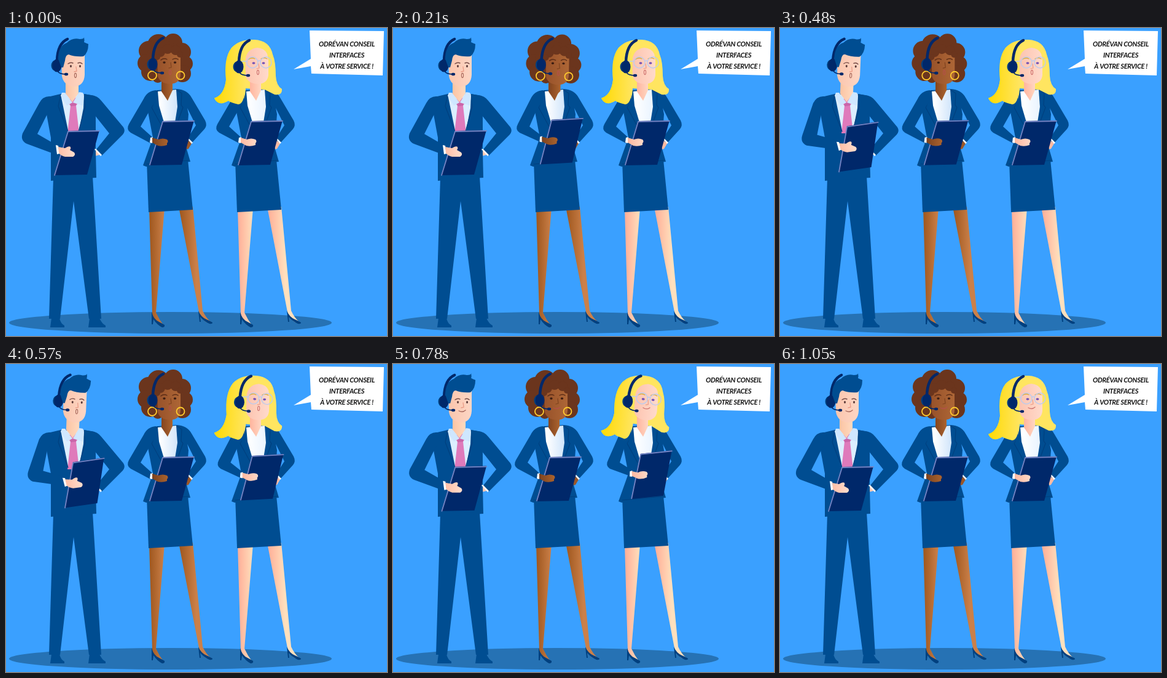
An HTML page with a canvas for the animation above (1.08 s loop, 620 by 500 pixels).

```html
<!DOCTYPE html>
<html lang="fr">
<head>
<meta charset="utf-8">
<style>
html, body { margin: 0; width: 100%; height: 100%; overflow: hidden; background: #3aa0ff; }
canvas { display: block; }
</style>
</head>
<body>
<canvas id="stage" width="620" height="500"></canvas>
<script>
const ctx = document.getElementById('stage').getContext('2d');
const LOOP = 1080, STEP = 30;
const SUIT = '#004d91', SEAM = '#00407f', NAVY = '#00286a', EDGE = '#7584c4';

const fill = (color, d) => { ctx.fillStyle = color; ctx.fill(new Path2D(d)); };
const line = (color, width, d) => {
  ctx.strokeStyle = color;
  ctx.lineWidth = width;
  ctx.stroke(new Path2D(d));
};
const oval = (color, x, y, rx, ry = rx) => {
  ctx.fillStyle = color;
  ctx.beginPath();
  ctx.ellipse(x, y, rx, ry, 0, 0, Math.PI * 2);
  ctx.fill();
};
const ring = (color, width, x, y, rx, ry = rx) => {
  ctx.strokeStyle = color;
  ctx.lineWidth = width;
  ctx.beginPath();
  ctx.ellipse(x, y, rx, ry, 0, 0, Math.PI * 2);
  ctx.stroke();
};
const fade = (x0, x1, a, b) => {
  const g = ctx.createLinearGradient(x0, 0, x1, 0);
  g.addColorStop(0, a);
  g.addColorStop(1, b);
  return g;
};
const group = (dx, dy, deg, px, py, draw) => {
  ctx.save();
  ctx.translate(px + dx, py + dy);
  ctx.rotate(deg * Math.PI / 180);
  ctx.translate(-px, -py);
  draw();
  ctx.restore();
};

const smooth = (t, a, b) => {
  const u = Math.min(1, Math.max(0, (t - a) / (b - a)));
  return u * u * (3 - 2 * u);
};
const bump = (t, a, b) => t > a && t < b ? Math.sin(Math.PI * (t - a) / (b - a)) ** 2 : 0;

function headset(x, y) {
  line(NAVY, 4.5, `M${x + 1} ${y - 8} Q${x + 2} ${y - 36} ${x + 18} ${y - 43}`);
  oval(SEAM, x - 2, y, 6.5, 8.5);
  oval(NAVY, x + 1, y, 7.5, 10.5);
  line(NAVY, 1.6, `M${x + 2} ${y + 9} Q${x + 5} ${y + 14} ${x + 15} ${y + 14}`);
  oval(NAVY, x + 16, y + 14, 3.2, 2.3);
}

function face(x, chin, skin, top = 40) {
  fill(skin, `M${x} ${top} L${x + 38} ${top} L${x + 38} 76 Q${x + 37} ${chin - 1} ${x + 21} ${chin}
    Q${x + 4} ${chin - 1} ${x + 1} 78Z`);
}

function mouth(x, y, open, color) {
  if (open) ring(color, 1.1, x, y, 1.6, 3.6);
  else line(color, 1.3, `M${x - 6} ${y - 1} Q${x} ${y + 2.5} ${x + 5} ${y - 2}`);
}

function board(d, edge) {
  fill(NAVY, d);
  line(EDGE, 1.8, edge);
}

function manHead(open) {
  fill(fade(96, 120, '#fbc3a2', '#ffdcc2'), 'M97 82 L118 82 L118 106 L108 120 L97 107Z');
  face(90, 95, fade(88, 128, '#fbc4ab', '#fdd6c4'));
  headset(82, 61);
  fill(SUIT, `M90 64 L85 50 Q85 29 99 24 Q108 15 120 18 Q127 18 127 15
    Q128 20 127 23 Q131 25 134 26 Q134 40 126 46 Q112 47 102 43 Q97 43 96 53 L93 64Z`);
  line('#754a45', 1.4, 'M101 58 Q105 55 109 57 M117 57 Q121 55 124 58');
  oval('#5a3a38', 105.5, 62, 1.5, 2);
  oval('#5a3a38', 120.5, 62, 1.5, 2);
  line('#e99b86', 1.3, 'M114 63 L115 70 L111 71');
  mouth(113, 77, open, '#a8695c');
}

function man(k, open) {
  fill(SUIT, `M77 244 L141 241 L155 472 L135 472 L110 281 L88 472 L70 472Z
    M74 471 L87 471 Q89 480 95 483 L95 486 L72 486Z M136 471 L152 471 Q156 480 162 483 L162 486 L134 486Z`);
  fill('#ffc9b5', 'M139 198 L150 197 L152 206 L140 209Z');
  fill(SUIT, 'M68 112 L89 107 L127 107 L143 110 L146 145 L146 200 L147 243 L73 248 L73 178 L66 140Z');
  fill(SUIT, `M126 107 L139 109 Q149 110 155 118 L191 161 Q195 167 190 173 L156 207
    L147 197 L168 171 L144 141Z`);
  fill('#fff', 'M144 197 L146 196 L156 206 L154 208Z');

  fill('#dceeff', 'M89 108 L127 107 L126 130 L118 171 L102 171Z');
  fill('#df7abb', 'M103 115 L115 113 L117 122 L114 126 L119 171 L100 171 L105 126 L101 122Z');
  fill('#c965a9', 'M104 122 L115 121 L114 126 L105 127Z');
  line(SEAM, 1.2, 'M89 108 L85 127 L101 168 M127 108 L129 128 L118 168');

  group(k, 0, 2.5 * k, 108, 106, () => manHead(open));
  fill('#cfe7ff', 'M91 105 L96 105 L108 121 L99 126 L89 110Z M119 104 L125 105 L127 110 L125 126 L109 121Z');

  const ex = 10 * k, ey = 3 * k, wx = 13 * k, wy = -8 * k;
  fill(SUIT, `M72 111 Q60 110 54 122 L${27 + ex} ${171 + ey} Q${23 + ex} ${183 + ey} ${34 + ex} ${188 + ey}
    L${80 + wx} ${205 + wy} L${84 + wx} ${191 + wy} L${51 + ex} ${172 + ey * .5} L67 140 L78 120Z`);

  group(wx, wy, -7.5 * k, 98, 201, () => {
    board('M101 167 L152 166 L132 238 L79 239Z', 'M79 239 L101 168 L152 167');
    fill('#fff', 'M81 190 L85 191 L87 204 L83 205Z');
    fill(fade(84, 112, '#ffbda5', '#ffddcd'), `M85 193 L96 195 Q102 191 105 193 Q106 196 104 198
      L111 202 Q114 206 109 209 L96 209 Q89 207 86 203Z`);
  });
}

const brown = {
  leg: ['#a0581f', '#cb8049'], neck: ['#84451f', '#ad652f'], hand: ['#7d431f', '#ad652f'], back: '#9a5628',
  shirt: ['#fff', '#d2e6fb']
};
const fair = {
  leg: ['#ffaf98', '#ffe0bd'], neck: ['#ffb59e', '#ffd8c4'], hand: ['#ffb8a0', '#ffdbca'], back: '#ffbaa2',
  shirt: ['#fff', '#eaf4ff']
};

function womanBody(tone) {
  fill(fade(234, 258, ...tone.leg), `M233 292 L258 292 L244 462 Q249 473 256 482 L250 483
    Q241 476 238 464Z`);
  fill(fade(283, 310, ...tone.leg), `M281 290 L304 290 L320 459 Q325 470 333 477 L327 478
    Q317 472 314 461Z`);
  fill(SEAM, `M237 461 Q240 473 249 477 Q253 479 258 482 Q259 486 254 486 Q246 482 240 473 L239 481 L237 481Z
    M313 459 Q317 469 326 473 Q331 475 336 478 Q336 481 331 480 Q322 476 316 469 L317 477 L315 477Z`);
  fill(SUIT, 'M229 216 L296 214 L304 295 L232 299Z');
  fill(tone.back, 'M289 187 L299 178 L303 186 L297 196 L288 199Z');
  fill(SUIT, 'M246 101 L238 103 L231 136 L239 178 L223 223 L228 225 L300 217 L293 193 L297 140 L290 103 L277 99Z');
  fill(SUIT, `M278 99 Q295 100 302 113 L324 150 Q328 158 323 164 L302 187 L294 181
    L309 158 L296 132Z`);
  fill('#fff', 'M295 180 L297 179 L304 186 L302 188Z');
  line(SEAM, 1.2, `M247 102 L236 107 L239 125 L237 129 L254 160 M277 100 L286 106 L285 125 L288 129 L278 156
    M229 221 L296 215`);
}

function womanFront(k, tone, m) {
  const ex = m.elbow * k, wx = m.x * k, wy = m.y * k;
  fill(SUIT, `M244 101 Q230 102 224 115 L${200 + ex} 156 Q${195 + ex} 165 ${203 + ex} 170
    L${235 + wx} ${187 + wy} L${239 + wx} ${178 + wy} L${219 + ex} 160 L232 137 L243 118Z`);
  group(wx, wy, m.turn * k, 250, 185, () => {
    board('M255 151 L306 150 L286 222 L234 223Z', 'M234 222 L255 152 L306 151');
    fill('#fff', 'M235 178 L239 177 L238 187 L234 186Z');
    fill(fade(238, 265, ...tone.hand), `M238 178 L248 181 Q255 178 262 181 Q265 184 262 187
      L262 190 Q254 193 247 191 L238 186Z`);
  });
}

function womanShirt(tone) {
  fill(fade(250, 278, ...tone.shirt), 'M247 103 L277 100 L279 128 L275 153 L257 153 L249 126Z');
  fill(fade(253, 272, ...tone.neck), 'M253 82 L271 82 L271 101 L263 118 L253 103Z');
}

function curlyHead(open) {
  const hair = '#6b351d';
  [[248, 28, 18], [272, 24, 15], [286, 39, 15], [232, 37, 16], [229, 57, 15], [235, 71, 15],
    [291, 58, 13], [287, 74, 14], [257, 48, 28], [247, 80, 9]].forEach(c => oval(hair, ...c));
  fill(fade(253, 272, ...brown.neck), 'M253 76 L271 76 L271 101 L262 110 L253 103Z');
  face(246, 91, fade(246, 284, '#98522a', '#ad6636'));
  [[251, 39, 8], [263, 34, 8], [276, 36, 8], [283, 43, 5], [246, 47, 5]].forEach(c => oval(hair, ...c));
  line('#5b2c17', 1.4, 'M252 52 Q257 48 262 51 M271 51 Q276 48 280 51');
  oval('#3b1d12', 257.5, 56, 2.2, 1.7);
  oval('#3b1d12', 275, 56, 2.2, 1.7);
  line('#7e421f', 1.2, 'M268 56 L269 64 L265 65');
  mouth(267, 72, open, '#b4504a');
  ring('#ffcb2e', 1.8, 238, 77, 7);
  ring('#ffcb2e', 1.8, 284, 77, 6.5);
  headset(238, 59);
}

const gold = () => fade(345, 390, '#ffdb0c', '#ffe560');

function longHair() {
  fill(gold(), `M339 114 Q355 109 358 84 Q354 49 367 32 Q380 18 404 19
    Q429 20 434 43 Q439 55 439 78 Q440 94 449 99 Q450 110 437 108 L421 100 L390 98
    Q389 123 377 124 Q365 121 362 118 Q346 128 339 114Z`);
}

function fairHead(open) {
  face(389, 91, fade(387, 427, '#fdc2ae', '#ffdacb'), 30);
  fill(gold(), `M374 31 Q394 13 419 23 Q435 33 437 76 L428 92
    Q429 56 425 42 Q421 33 409 32 Q389 34 389 58 L389 85 Q390 123 378 124 Q365 121 362 118
    Q346 128 339 114 Q355 109 358 85 L374 60Z`);
  line('#dcae3c', 1.4, 'M394 51 Q400 47 405 50 M415 50 Q420 47 425 50');
  oval('#7553b5', 403, 57, 2.5, 1.8);
  oval('#7553b5', 419, 57, 2.5, 1.8);
  line('#eb9c86', 1.2, 'M411 58 L412 65 L408 66');
  mouth(410, 72, open, '#cf7470');
  ring('#bccbed', 1.4, 401, 56, 9);
  ring('#bccbed', 1.4, 423, 56, 9);
  line('#bccbed', 1.4, 'M410 54 Q412 52 414 54 M384 54 L392 54');
  headset(378, 63);
}

function bubble() {
  fill('#fff', 'M494 4 L615 5 L613 77 L497 74 L496 62 L468 67 L496 50Z');
  ctx.fillStyle = '#111';
  ctx.font = 'italic bold 11px Lato, "Open Sans", sans-serif';
  ctx.letterSpacing = '-0.3px';
  ctx.textAlign = 'center';
  ctx.textBaseline = 'alphabetic';
  ['ODRÉVAN CONSEIL', 'INTERFACES', 'À VOTRE SERVICE !'].forEach((s, i) => ctx.fillText(s, 554.5, 30 + i * 18));
}

function draw(t) {
  const a = bump(t, 0, 540);
  const b = bump(t, 240, 810);
  const c = smooth(t, 480, 690) - smooth(t, 870, 1050);
  const open = t < 630;

  ctx.fillStyle = '#3aa0ff';
  ctx.fillRect(0, 0, 620, 500);
  oval('#2672b4', 267.5, 478.5, 262.5, 17.5);
  man(b, open);

  womanBody(brown);
  womanShirt(brown);
  group(1.5 * a, 1.5 * a, 1.5 * a, 262, 105, () => curlyHead(open));
  womanFront(a, brown, { elbow: 3.5, x: 5, y: -2.3, turn: -2.5 });

  const shift = draw => group(144, 0, 0, 0, 0, draw);
  const nod = draw => group(0, 0, 5 * c, 406, 105, draw);
  shift(() => womanBody(fair));
  nod(longHair);
  shift(() => womanShirt(fair));
  shift(() => womanFront(c, fair, { elbow: 6, x: 7, y: -5, turn: -5 }));
  nod(() => fairHead(open));

  bubble();
}

ctx.lineCap = 'round';
ctx.lineJoin = 'round';
const start = performance.now();
function tick() {
  const t = (performance.now() - start) % LOOP;
  draw(Math.floor(t / STEP) * STEP);
  requestAnimationFrame(tick);
}
tick();
</script>
</body>
</html>
```
